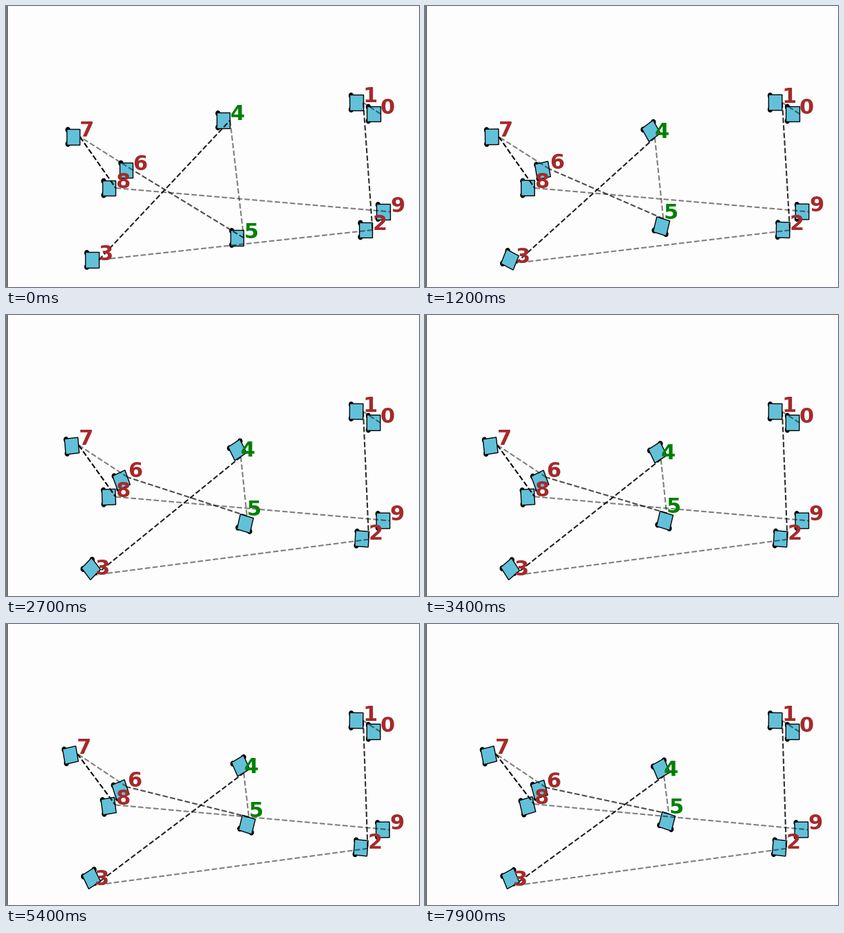
Animation of 600x409 px, one loop 8000 ms. Source, as a matplotlib script:

```python
import numpy as np
import matplotlib.pyplot as plt
from matplotlib.animation import FuncAnimation
from matplotlib.patches import Polygon

W, H, DPI = 600, 409, 100
FRAMES, STEP_MS, HOLD, SUB = 80, 100, 4, 20
SCALE = np.array([199.5, -231.3])      # pixels per metre, y pointing up
AHEAD, HALF = 0.05, 0.049              # lookahead point, half body size
GAIN, MEET = 0.075, 0.14               # link gain per frame, gap of the leaders
LEADERS = (4, 5)
BACKDROP, BODY = "#fefdfe", "#62c1d9"

# start centres in pixels; neighbours in this list are linked
START = np.array([(534, 157), (509, 140.5), (522.5, 326), (125, 369.5),
                  (315.5, 166.5), (335.5, 337.5), (174.5, 239), (97.5, 190.5),
                  (149.5, 265), (548, 299.5)])
LINK_ALPHA = [0.5, 0.82, 0.5, 0.88, 0.5, 0.7, 0.5, 1.0, 0.5]
COUNT = len(START)


def simulate(steps):
    """Links hold their length while the leaders close in on each other.

    The links act on the lookahead points, which drag the headings along.
    """
    tip = START / SCALE + [AHEAD, 0]
    theta = np.zeros(COUNT)
    length = np.linalg.norm(np.diff(tip, axis=0), axis=1)
    length[LEADERS[0]] = MEET
    poses = [(tip, theta)]
    for _ in range(steps):
        for _ in range(SUB):
            edge = np.diff(tip, axis=0)
            stretch = (edge ** 2).sum(axis=1) - length ** 2
            pull = GAIN / SUB * stretch[:, None] * edge
            move = np.zeros_like(tip)
            move[:-1] += pull
            move[1:] -= pull
            turn = np.cos(theta) * move[:, 1] - np.sin(theta) * move[:, 0]
            theta = theta + turn / AHEAD
            tip = tip + move
        poses.append((tip, theta))
    return poses


def rotate(shape, angle):
    c, s = np.cos(angle), np.sin(angle)
    return shape @ np.array([[c, s], [-s, c]])


POSES = simulate(FRAMES - HOLD)
SQUARE = HALF * np.array([[1, 1], [-1, 1], [-1, -1], [1, -1]])
arc = np.linspace(0, 2 * np.pi, 32, endpoint=False)
DISC = 0.0185 * np.column_stack([np.cos(arc), np.sin(arc)])
WHEELS = [DISC + [-0.038, side * 0.044] for side in (1, -1)]

fig = plt.figure(figsize=(W / DPI, H / DPI), dpi=DPI, facecolor=BACKDROP)
ax = fig.add_axes([0, 0, 1, 1])
ax.set_xlim(0, W)
ax.set_ylim(H, 0)
ax.axis("off")
ax.plot([1.4, 1.4], [-5, H + 5], color="k", lw=1)

parts = []
for i in range(COUNT):
    for wheel in WHEELS:
        parts.append((i, wheel, ax.add_patch(
            Polygon(wheel, fc="k", ec="none", zorder=1))))
    parts.append((i, SQUARE, ax.add_patch(
        Polygon(SQUARE, fc=BODY, ec="k", lw=1, zorder=1))))

links = [ax.plot([], [], "k--", lw=1.5, alpha=a, zorder=2)[0]
         for a in LINK_ALPHA]
labels = [ax.text(0, 0, str(i), fontsize=22, fontweight="bold",
                  family="DejaVu Sans", zorder=3,
                  color="green" if i in LEADERS else "brown")
          for i in range(COUNT)]


def draw(frame):
    tip, theta = POSES[max(0, frame - HOLD)]
    centre = tip - AHEAD * np.column_stack([np.cos(theta), np.sin(theta)])
    for i, shape, patch in parts:
        patch.set_xy((centre[i] + rotate(shape, theta[i])) * SCALE)
    points = tip * SCALE
    for i, line in enumerate(links):
        line.set_data(points[i:i + 2, 0], points[i:i + 2, 1])
    for point, label in zip(points, labels):
        label.set_position(point)
    return [p for _, _, p in parts] + links + labels


anim = FuncAnimation(fig, draw, frames=FRAMES, interval=STEP_MS,
                     repeat=True, repeat_delay=0, blit=False)
plt.show()
```
